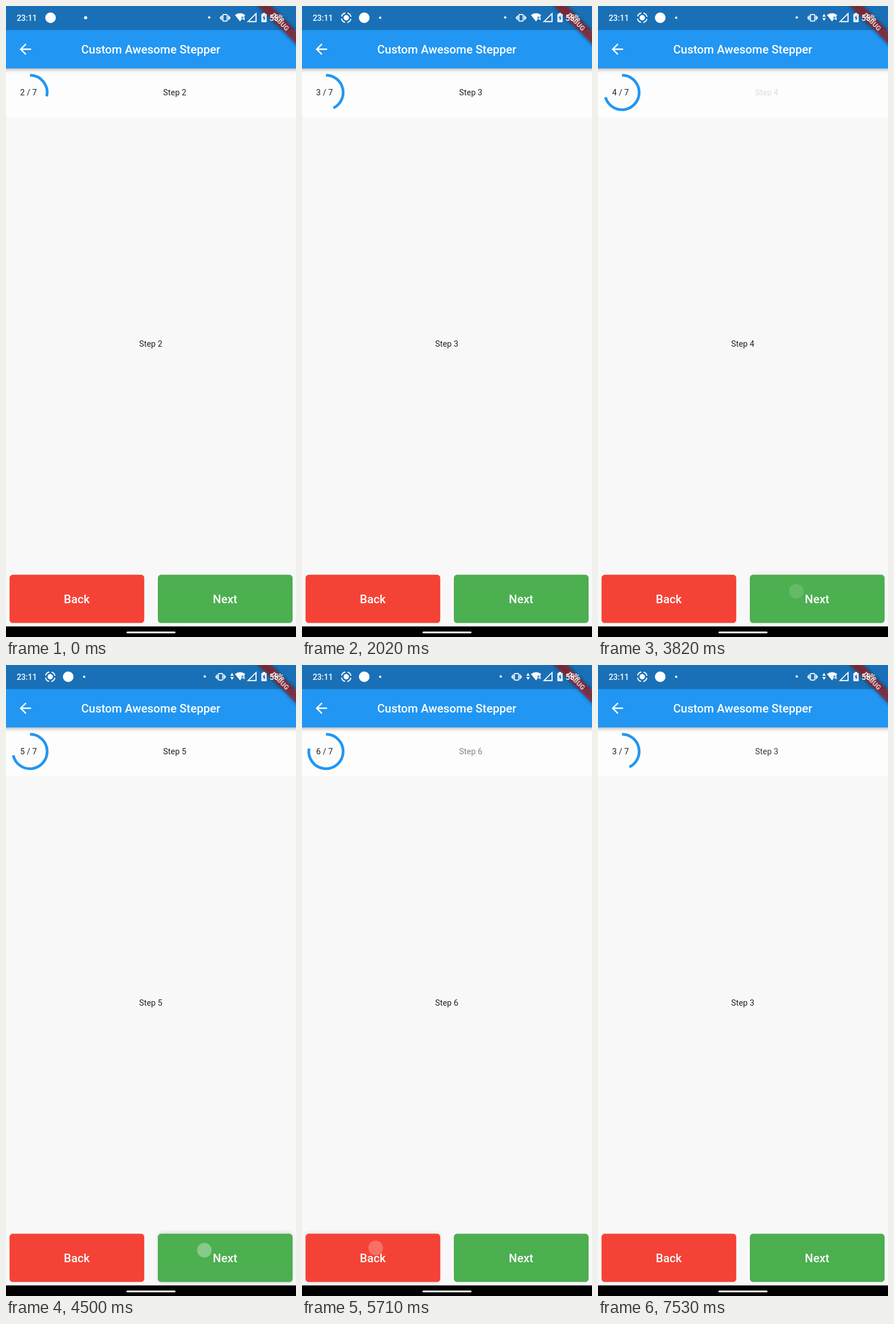
Recreate the animation shown at these times as an HTML page. Size 508x1102 px, loop 7.56 s.

```html
<!DOCTYPE html>
<html lang="en">
<head>
<meta charset="utf-8">
<title>Stepper</title>
<style>
  html, body { margin: 0; width: 100%; height: 100%; overflow: hidden; background: #f8f8f8; }
  svg { display: block; width: 100vw; height: 100vh; font-family: Roboto, sans-serif; }
  text { text-anchor: middle; }
  .body { font-size: 14.4px; fill: #222; }
  .label { font-size: 20.5px; font-weight: 500; fill: #fff; }
  .status { font-size: 14px; font-weight: 500; fill: #fff; }
</style>
</head>
<body>
<svg viewBox="0 0 508 1102" preserveAspectRatio="none">
  <defs>
    <filter id="blur" x="-20%" y="-150%" width="140%" height="400%"><feGaussianBlur stdDeviation="3"/></filter>
    <clipPath id="under"><rect y="109" width="508" height="20"/></clipPath>
  </defs>

  <rect width="508" height="1102" fill="#f8f8f8"/>
  <rect y="109" width="508" height="85" fill="#fdfdfd"/>
  <g clip-path="url(#under)">
    <rect x="-20" y="60" width="548" height="51" fill="#000" opacity=".32" filter="url(#blur)"/>
  </g>
  <rect y="41" width="508" height="68" fill="#2196f3"/>
  <rect width="508" height="42" fill="#1970b6"/>

  <!-- corner ribbon, below the system icons -->
  <g transform="translate(508 0) rotate(45)">
    <rect x="-75" y="31" width="150" height="16" fill="#000" opacity=".45" filter="url(#blur)"/>
    <rect x="-75" y="31" width="150" height="16" fill="#b71c1c" opacity=".6"/>
    <text y="43.4" font-size="12" font-weight="900" fill="#fff" opacity=".72">DEBUG</text>
  </g>

  <!-- status bar -->
  <text class="status" x="36.4" y="26">23:11</text>
  <g id="record" fill="none" stroke="#fff">
    <circle cx="77.5" cy="20.5" r="4.7" fill="#fff" stroke="none"/>
    <circle cx="77.5" cy="20.5" r="8.4" stroke-width="2" stroke-dasharray="9.2 4" stroke-dashoffset="-2"/>
  </g>
  <circle id="app" cx="78" cy="20.5" r="9.3" fill="#fff"/>
  <circle id="more" cx="139.5" cy="20.5" r="2.8" fill="#fff"/>
  <g id="mode" fill="none" stroke="#fff" stroke-width="1.7">
    <circle cx="356" cy="20" r="2.1" fill="#fff" stroke="none"/>
    <rect x="380" y="14.8" width="7.4" height="11.6" rx="1"/>
    <path d="M377.6 16.5v8.2M389.9 16.5v8.2M375.6 18.5v4.2M391.9 18.5v4.2"/>
  </g>
  <path id="traffic" d="M393 18.8l3-5 3 5zM393 21l3 5 3-5z" fill="#fff"/>
  <path d="M401 15.8q9-6.4 18 0l-2 2.9h-4.3v4.6l-2.7 3.6z" fill="#fff"/>
  <path d="M417.3 18.7l-3.1 4h4M417.2 18.7v6" fill="none" stroke="#fff" stroke-width="1.2"/>
  <path d="M424 27.2h14v-14z" fill="none" stroke="#fff" stroke-width="1.9"/>
  <path d="M447.4 14h2.4v-1.8h4.2V14h2.5v14.2h-9.1z" fill="#fff"/>
  <path d="M452.8 15.5l-3.4 6h2.1v5l3.3-6.3h-2z" fill="#1970b6"/>
  <text class="status" x="474.5" y="26">55%</text>

  <!-- app bar -->
  <path transform="translate(19 60.5) scale(1.25)" fill="#fff"
    d="M20 11H7.83l5.59-5.59L12 4l-8 8 8 8 1.41-1.41L7.83 13H20z"/>
  <text class="label" x="253.6" y="83">Custom Awesome Stepper</text>

  <!-- step header and page -->
  <path id="arc" fill="none" stroke="#2196f3" stroke-width="4.8"/>
  <text id="count" class="body" x="39.5" y="156.3"></text>
  <text id="title" class="body" x="295.6" y="156.3"></text>
  <text id="page" class="body" x="253.5" y="595.2"></text>

  <!-- buttons -->
  <rect id="lift" y="991" width="236" height="88" rx="8" fill="#000" filter="url(#blur)"/>
  <rect x="6.2" y="993.3" width="236" height="84.2" rx="5.5" fill="#f44336"/>
  <rect x="266" y="993.3" width="236" height="84.2" rx="5.5" fill="#4caf50"/>
  <circle id="touch" r="12.8" fill="#fff"/>
  <text class="label" x="124" y="1043">Back</text>
  <text class="label" x="383.7" y="1043">Next</text>

  <rect y="1083.5" width="508" height="18.5" fill="#000"/>
  <rect x="211" y="1092.5" width="86" height="3" rx="1.5" fill="#fff"/>
</svg>
<script>
  const LOOP = 7560, TOTAL = 7, ARC_MS = 250, FADE_MS = 300;
  // press time, release time, step before, step after
  const TAPS = [
    [30, 120, 2, 3],
    [2610, 2700, 3, 4],
    [3560, 3650, 4, 5],
    [4500, 4620, 5, 6],
    [5480, 5630, 6, 5],
    [6260, 6260, 5, 4],
    [7050, 7050, 4, 3]
  ];

  const el = {};
  document.querySelectorAll('svg [id]').forEach(n => { el[n.id] = n; });

  const clamp = v => Math.max(0, Math.min(1, v));
  const mix = (a, b, p) => a + (b - a) * p;
  const set = (name, attrs) => {
    for (const k in attrs) el[name].setAttribute(k, attrs[k]);
  };

  // cubic-bezier(.25, .1, .25, 1)
  function ease(x) {
    if (x <= 0 || x >= 1) return clamp(x);
    const curve = (a, b, s) => 3 * a * s * (1 - s) ** 2 + 3 * b * s * s * (1 - s) + s ** 3;
    let lo = 0, hi = 1;
    for (let i = 0; i < 20; i++) {
      const mid = (lo + hi) / 2;
      if (curve(.25, .25, mid) < x) lo = mid; else hi = mid;
    }
    return curve(.1, 1, lo);
  }

  function arcPath(part) {
    const a = part * 2 * Math.PI, r = 30.1, cx = 42, cy = 151;
    const x = cx + r * Math.sin(a), y = cy - r * Math.cos(a);
    return `M${cx} ${cy - r}A${r} ${r} 0 ${part > .5 ? 1 : 0} 1 ${x} ${y}`;
  }

  function drawStatus(t) {
    const p = ease((t - 30) / 200);
    set('record', { opacity: p });
    set('app', { cx: mix(78, 109, p) });
    set('more', { cx: mix(139.5, 137, p), r: mix(2.8, 2.1, p) });
    const busy = t >= 2090;
    set('mode', { transform: `translate(${busy ? -7.8 : 0} 0)` });
    set('traffic', { opacity: busy ? 1 : 0 });
  }

  function drawStep(t) {
    let tap = TAPS[0];
    for (const next of TAPS) if (t >= next[0]) tap = next;
    const [press, release, from, to] = tap;
    const since = t - release;
    const swapped = since >= FADE_MS;
    const step = swapped ? to : from;
    const alpha = swapped ? ease((since - FADE_MS) / FADE_MS) : 1 - ease(since / FADE_MS);

    set('arc', { d: arcPath(mix(from, to, ease(since / ARC_MS)) / TOTAL) });
    el.count.textContent = `${step} / ${TOTAL}`;
    el.title.textContent = el.page.textContent = `Step ${step}`;
    set('title', { opacity: alpha, y: alpha < 1 ? 155.6 : 156.3 });

    const held = t < press ? 0 : 1 - clamp(since / 300);
    const forward = to > from;
    set('touch', { cx: forward ? 347.5 : 129, cy: forward ? 1022 : 1018, opacity: .33 * held });
    set('lift', { x: forward ? 266 : 6, opacity: .12 * held });
  }

  function draw(t) {
    drawStatus(t);
    drawStep(t);
  }

  const start = performance.now();
  function tick(now) {
    draw(Math.max(0, now - start) % LOOP);
    requestAnimationFrame(tick);
  }
  draw(0);
  requestAnimationFrame(tick);
</script>
</body>
</html>
```
